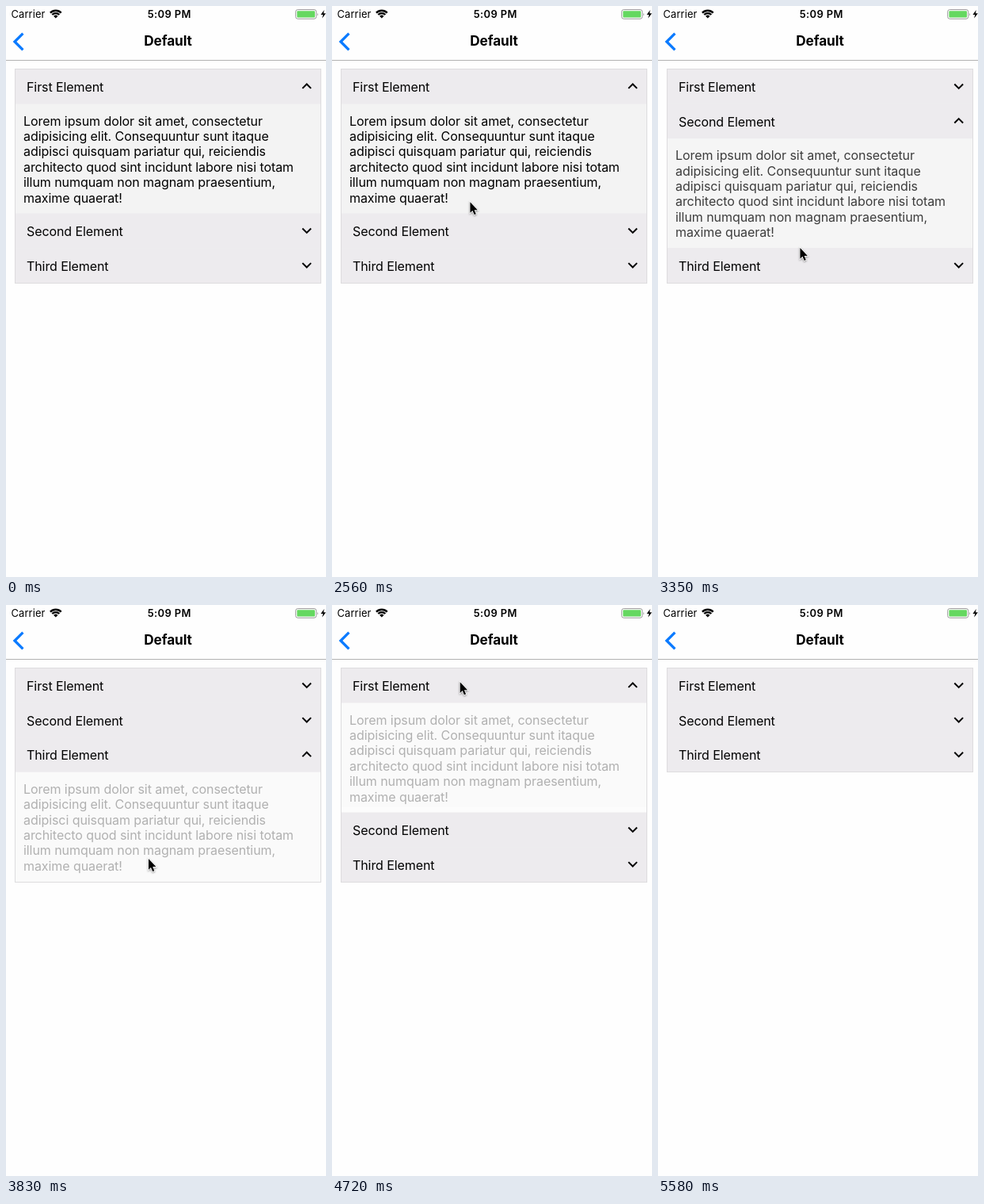
These frames come from a looping animation (404 by 720 pixels, 5970 ms). An HTML page:

```html
<!DOCTYPE html>
<html lang="en">
<head>
<meta charset="utf-8">
<title>Accordion</title>
<style>
  html, body { margin: 0; width: 100%; height: 100%; overflow: hidden; background: #fefefe; }
  svg { display: block; font: 16px Inter, "Open Sans", sans-serif; letter-spacing: -.09px; }
  .status { font-size: 12.9px; letter-spacing: .12px; }
  .clock { font-weight: 600; letter-spacing: .4px; }
  .title { font-size: 17.2px; font-weight: 700; }
  .body { letter-spacing: -.07px; }
  .line { fill: none; stroke: #000; }
</style>
</head>
<body>
<svg width="404" height="720" viewBox="0 0 404 720">
  <text class="status" x="6.5" y="15">Carrier</text>
  <g transform="translate(62.8 15.5)">
    <path d="M0 0L-2.7 -2.7A3.8 3.8 0 0 1 2.7 -2.7Z"/>
    <path class="line" stroke-width="2.3" d="M-4.5 -4.5A6.3 6.3 0 0 1 4.5 -4.5M-6.9 -6.9A9.8 9.8 0 0 1 6.9 -6.9"/>
  </g>
  <text class="status clock" x="206.3" y="15" text-anchor="middle">5:09 PM</text>
  <rect class="line" x="365.7" y="4.6" width="26" height="11.6" rx="2.6" style="stroke:#999"/>
  <rect x="367.4" y="6.3" width="22.6" height="8.2" rx="1" fill="#65d860"/>
  <path d="M393 8.4q1.6 2 0 4z" fill="#999"/>
  <path d="M401.7 5L397.4 11H400.2L399.2 15.5L403.8 9.3H400.9Z"/>

  <path class="line" d="M21.4 34.7L11 45L21.4 55.3" stroke-width="3.3" style="stroke:#0a7aff"/>
  <text class="title" x="204.5" y="50" text-anchor="middle">Default</text>
  <rect y="68" width="404" height="1" fill="#b2b2b2"/>

  <g id="content">
    <rect x="11" width="387" height="139" fill="#f3f3f3"/>
  </g>
  <g id="rows"></g>
  <rect id="frame" class="line" x="11.5" y="79.5" width="386" style="stroke:#dddcde"/>

  <path id="pointer" d="M0 0V13.6L3 10.8L5.2 15.9L7.4 15L5.2 10H9.4Z"
    stroke="#fff" stroke-width="1.6" paint-order="stroke" style="filter:drop-shadow(0 1px 1px #0006)"/>
</svg>
<script>
const LOOP = 5970, TOP = 79.5, ROW = 43.6, BODY = 138.4, FADE = 500;
const lines = [
  "Lorem ipsum dolor sit amet, consectetur",
  "adipisicing elit. Consequuntur sunt itaque",
  "adipisci quisquam pariatur qui, reiciendis",
  "architecto quod sint incidunt labore nisi totam",
  "illum numquam non magnam praesentium,",
  "maxime quaerat!"
];
// when each row is tapped; -1 means all closed
const taps = [
  { at: -FADE, open: 0 },
  { at: 3050, open: 1 },
  { at: 3830, open: 2 },
  { at: 4720, open: 0 },
  { at: 5270, open: -1 }
];
// where the pointer enters, turns, rests and leaves
const stops = [
  { at: 2000, x: 238, y: 718 },
  { at: 2400, x: 170, y: 206 },
  { at: 2720, x: 178.8, y: 287.8 },
  { at: 3050, x: 178.8, y: 287.8 },
  { at: 3620, x: 180, y: 320.5 },
  { at: 3830, x: 180, y: 320.5 },
  { at: 4260, x: 163.7, y: 154.5 },
  { at: 4580, x: 161.7, y: 97.3 },
  { at: 5130, x: 161.7, y: 97.3 },
  { at: 5330, x: 178, y: 140 },
  { at: 5580, x: 405, y: 730 }
];

const $ = id => document.getElementById(id);
const add = (parent, tag, attrs, text = "") => {
  const el = document.createElementNS("http://www.w3.org/2000/svg", tag);
  for (const name in attrs) el.setAttribute(name, attrs[name]);
  el.textContent = text;
  return parent.appendChild(el);
};
const moveTo = (el, x, y) => el.setAttribute("transform", `translate(${x} ${y})`);
const mix = (a, b, p) => a + (b - a) * p;
const easeInOut = p => p < .5 ? (2 * p) ** 1.67 / 2 : 1 - (2 - 2 * p) ** 1.67 / 2;
const chevron = dir => `M374.3 ${21.7 - 2.7 * dir}l5.4 ${5.4 * dir}l5.4 ${-5.4 * dir}`;

lines.forEach((text, i) => add($("content"), "text", { class: "body", x: 22, y: 27.5 + i * 19.42 }, text));

const rows = ["First", "Second", "Third"].map(name => {
  const g = add($("rows"), "g", {});
  add(g, "rect", { x: 11, width: 387, height: ROW + .4, fill: "#edebee" });
  add(g, "text", { x: 26, y: 28.5 }, name + " Element");
  return { g, arrow: add(g, "path", { class: "line", "stroke-width": 2 }) };
});

function drawRows(t) {
  const { at, open } = taps.findLast(tap => tap.at <= t);
  rows.forEach(({ g, arrow }, i) => {
    moveTo(g, 0, TOP + i * ROW + (open >= 0 && i > open ? BODY : 0));
    arrow.setAttribute("d", chevron(i === open ? -1 : 1));
  });
  const content = $("content");
  content.style.display = open < 0 ? "none" : "";
  content.style.opacity = mix(.3, 1, easeInOut(Math.min(1, (t - at) / FADE)));
  moveTo(content, 0, TOP + (open + 1) * ROW);
  $("frame").setAttribute("height", open < 0 ? 131 : 270);
}

function drawPointer(t) {
  const next = stops.findIndex(stop => stop.at > t);
  $("pointer").style.display = next > 0 ? "" : "none";
  if (next < 1) return;
  const a = stops[next - 1], b = stops[next];
  const p = (t - a.at) / (b.at - a.at);
  moveTo($("pointer"), mix(a.x, b.x, p), mix(a.y, b.y, p));
}

function draw() {
  const t = performance.now() % LOOP;
  drawRows(t);
  drawPointer(t);
  requestAnimationFrame(draw);
}
draw();
</script>
</body>
</html>
```
